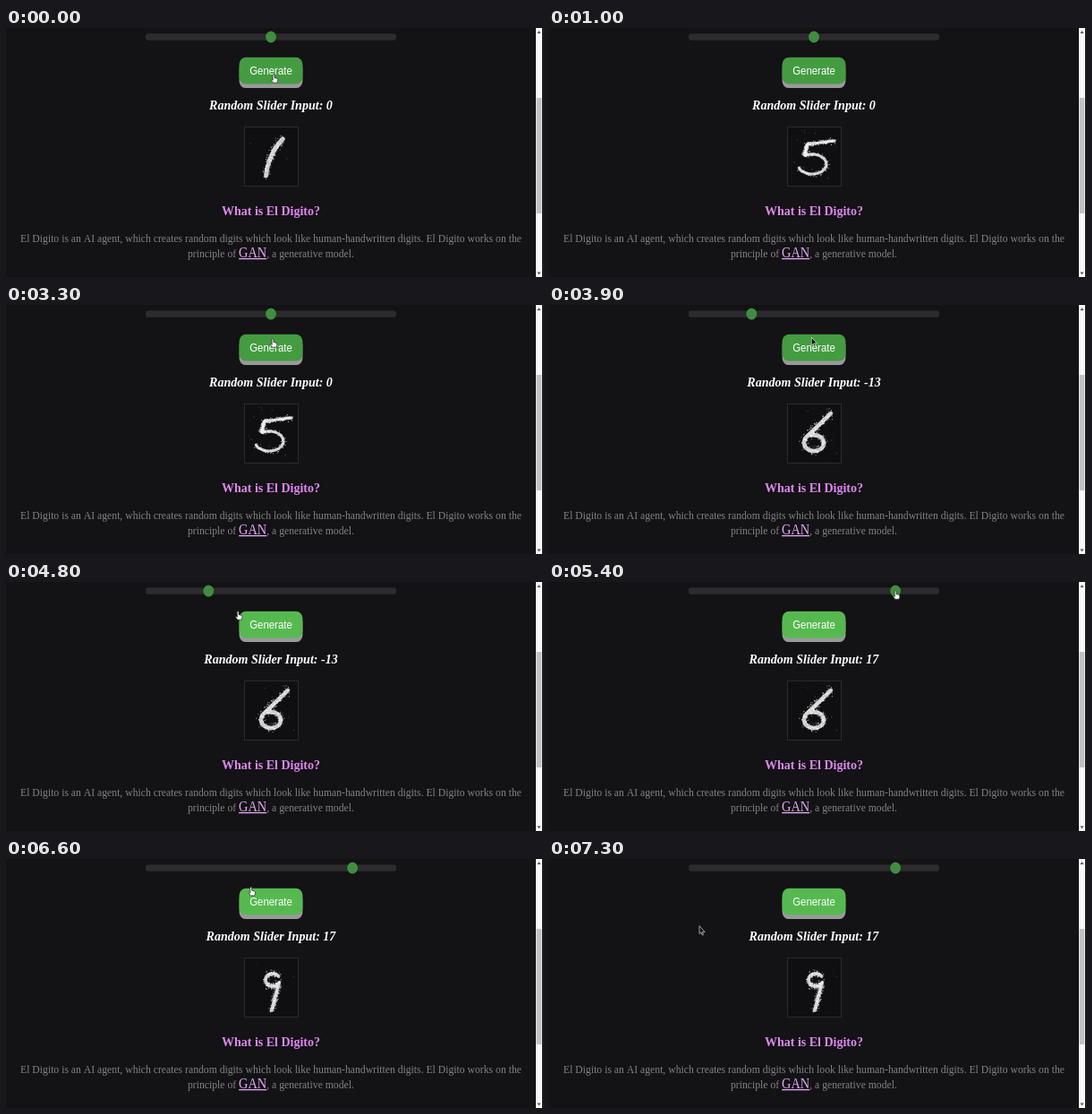
An HTML page with a canvas that plays this animation: 600 by 278 pixels, repeating every 7400 ms.

```html
<!DOCTYPE html>
<html lang="en">
<head>
<meta charset="utf-8">
<title>Random digit generator</title>
<style>
html, body { margin: 0; width: 100%; height: 100%; overflow: hidden; background: #131214; }
canvas { display: block; width: 600px; height: 278px; }
</style>
</head>
<body>
<canvas id="stage" width="600" height="278"></canvas>
<script>
const ctx = document.getElementById('stage').getContext('2d');
const LOOP = 7400, STEP = 100;
const MID = 296;
const TALL = 1.1; // the page is shown slightly taller than wide
const SERIF = '"Liberation Serif", "Times New Roman", serif';
const SANS = '"Liberation Sans", Arial, sans-serif';

const ramp = (t, from, to) => Math.max(0, Math.min(1, (t - from) / (to - from)));
const mix = (a, b, p) => a + (b - a) * p;

function seeded(seed) {
  let s = seed * 7919;
  return () => (s = (s * 16807) % 2147483647) / 2147483647;
}

// Pen strokes map 0..1 to a point
const line = (x0, y0, x1, y1) => u => [mix(x0, x1, u), mix(y0, y1, u)];
const arc = (x, y, rx, ry, from, to) => u => {
  const a = mix(from, to, u);
  return [x + rx * Math.cos(a), y + ry * Math.sin(a)];
};

const digits = {
  one: { width: 6.5, noise: 4, strokes: [arc(341, 174, 51, 64, -2.24, -3)] },
  five: { width: 4, noise: 14, strokes: [line(319, 126, 288, 130), line(288, 130, 286, 142), arc(294, 152, 16, 11, -2.1, 2.75)] },
  six: { width: 6, noise: 12, strokes: [line(315, 121, 286, 149), arc(296, 154, 11, 9, -2.6, -8.2)] },
  slantedOne: { width: 7, noise: 22, strokes: [line(302, 125, 291, 163)] },
  nine: { width: 5, noise: 3, strokes: [arc(298, 135, 8, 7, -0.6, -5.9), line(305, 138, 297, 169)] }
};

function box(x, y, w, h, r, color) {
  ctx.fillStyle = color;
  ctx.beginPath();
  ctx.roundRect(x, y, w, h, r);
  ctx.fill();
}

function text(str, x, y, font, color, align = 'center') {
  ctx.save();
  ctx.translate(x, y);
  ctx.scale(1, TALL);
  ctx.font = font;
  ctx.fillStyle = color;
  ctx.textAlign = align;
  ctx.fillText(str, 0, 0);
  const width = ctx.measureText(str).width;
  ctx.restore();
  return width;
}

function drawDigit({ width, noise, strokes }) {
  const rnd = seeded(noise);
  const spread = () => (rnd() + rnd() + rnd() - 1.5) * width * 0.7;
  const dot = (x, y, alpha) => {
    ctx.fillStyle = `rgba(250,250,250,${alpha})`;
    ctx.fillRect(x - 0.5, y - 0.5, 1, 1);
  };
  ctx.strokeStyle = 'rgba(245,245,245,.8)';
  ctx.lineWidth = width * 0.75;
  ctx.lineCap = ctx.lineJoin = 'round';
  ctx.beginPath();
  for (const stroke of strokes) {
    for (let i = 0; i <= 30; i++) ctx.lineTo(...stroke(i / 30));
  }
  ctx.stroke();
  for (const stroke of strokes) {
    for (let i = 0; i < 180; i++) {
      const [x, y] = stroke(rnd());
      dot(x + spread(), y + spread(), 0.3 + rnd() * 0.6);
    }
  }
  for (let i = 0; i < noise; i++) {
    dot(269 + rnd() * 55, 113 + rnd() * 60, 0.1 + rnd() * 0.3);
  }
}

function drawDigitBox(digit) {
  box(266, 110, 61, 67, 0, '#2b2a2c');
  box(267, 111, 59, 65, 0, '#0f0e10');
  drawDigit(digit);
}

function drawButton(hover, pressed) {
  const y = pressed ? 34.6 : 32.7;
  box(MID - 35.4, y + (pressed ? 2.5 : 4.6), 70.8, 29.8, 7.5, pressed ? '#666' : '#999');
  box(MID - 35.4, y, 70.8, 29.8, 7.5, hover ? '#449c40' : '#55b950');
  text('Generate', MID, y + 19, '11.4px ' + SANS, '#fff');
}

function drawSlider(thumb) {
  box(156, 6.3, 280, 7.4, 3, '#2c2b2d');
  ctx.fillStyle = '#3f8e3f';
  ctx.beginPath();
  ctx.ellipse(thumb, 10, 5.9, 6.5, 0, 0, Math.PI * 2);
  ctx.fill();
}

function drawCopy(value) {
  text('Random Slider Input: ' + value, MID, 91, 'italic bold 14.05px ' + SERIF, '#fff');
  text('What is El Digito?', MID, 208.6, 'bold 14px ' + SERIF, '#dd86ef');
  const body = '11.69px ' + SERIF, grey = '#828184', pink = '#e4a8f6';
  text('El Digito is an AI agent, which creates random digits which look like human-handwritten digits. El Digito works on the', MID, 239, body, grey);
  let x = 203;
  x += text('principle of ', x, 255.6, body, grey, 'left');
  const link = text('GAN', x, 255.6, '14.35px ' + SERIF, pink, 'left');
  box(x, 257, link, 1.3, 0, pink);
  text(', a generative model.', x + link, 255.6, body, grey, 'left');
}

function drawScrollbar() {
  box(592, 0, 7, 278, 0, '#f8f8f8');
  box(592.6, 78, 5.8, 129, 0, '#c2c2c2');
  ctx.fillStyle = '#555';
  for (const [base, tip] of [[6, 3], [272.5, 275.5]]) {
    ctx.beginPath();
    ctx.moveTo(593.5, base);
    ctx.lineTo(597.5, base);
    ctx.lineTo(595.5, tip);
    ctx.fill();
  }
}

const arrow = new Path2D('M0 0V8.5L2 6.8 3.3 10 4.6 9.4 3.3 6.4H5.7Z');
const hand = new Path2D('M-.9 0Q0-.8.9 0V3.4L4.2 4.4Q5 4.8 4.8 6.4L4 9.2H-.4L-2.8 6Q-2.6 4.8-.9 6Z');

function drawCursor([x, y], isHand) {
  ctx.save();
  ctx.translate(x, y);
  ctx.lineWidth = 0.7;
  ctx.lineJoin = 'round';
  ctx.fillStyle = isHand ? '#fff' : '#111';
  ctx.strokeStyle = isHand ? '#222' : '#ddd';
  ctx.fill(isHand ? hand : arrow);
  ctx.stroke(isHand ? hand : arrow);
  ctx.restore();
}

const sliderValue = t => Math.round(-13 * ramp(t, 3400, 3700) + 30 * ramp(t, 4900, 5400));
const thumbX = t => MID + 5.36 * sliderValue(t);

// The pointer alternates between the button and the thumb, then leaves
function cursorAt(t) {
  let x = 299, y = 52;
  const move = (from, to, tx, ty) => {
    const p = ramp(t, from, to);
    x = mix(x, tx, p);
    y = mix(y, ty, p);
  };
  move(3250, 3400, thumbX(t), 10);
  move(3700, 3950, 310, 43);
  move(4100, 4500, 292, 56);
  move(4700, 4900, thumbX(t), 10);
  move(5500, 5800, 309, 55);
  move(6400, 7200, 168, 75);
  y -= 40 * Math.sin(Math.PI * ramp(t, 6400, 7200));
  return [x, y];
}

const overButton = ([x, y]) => Math.abs(x - MID) <= 35 && y >= 33 && y <= 67;
const overSlider = ([x, y]) => Math.abs(x - MID) <= 140 && y >= 3 && y <= 17;

function currentDigit(t) {
  if (t < 200) return digits.one;
  if (t < 3700) return digits.five;
  if (t < 5500) return digits.six;
  return t < 6200 ? digits.slantedOne : digits.nine;
}

function render(t) {
  const cursor = cursorAt(t);
  const pressed = t === 100 || (t >= 5900 && t < 6200);
  box(0, 0, 600, 278, 0, '#131214');
  drawSlider(thumbX(t));
  drawButton(overButton(cursor), pressed);
  drawCopy(sliderValue(t));
  drawDigitBox(currentDigit(t));
  drawScrollbar();
  if (t < 800 || t >= 3300) {
    // the pointer shape follows one step behind the hover state
    const last = cursorAt(t - STEP);
    drawCursor(cursor, overButton(last) || overSlider(last));
  }
}

const start = performance.now();
function tick() {
  const t = (performance.now() - start) % LOOP;
  render(Math.floor(t / STEP) * STEP);
  requestAnimationFrame(tick);
}
tick();
</script>
</body>
</html>
```
